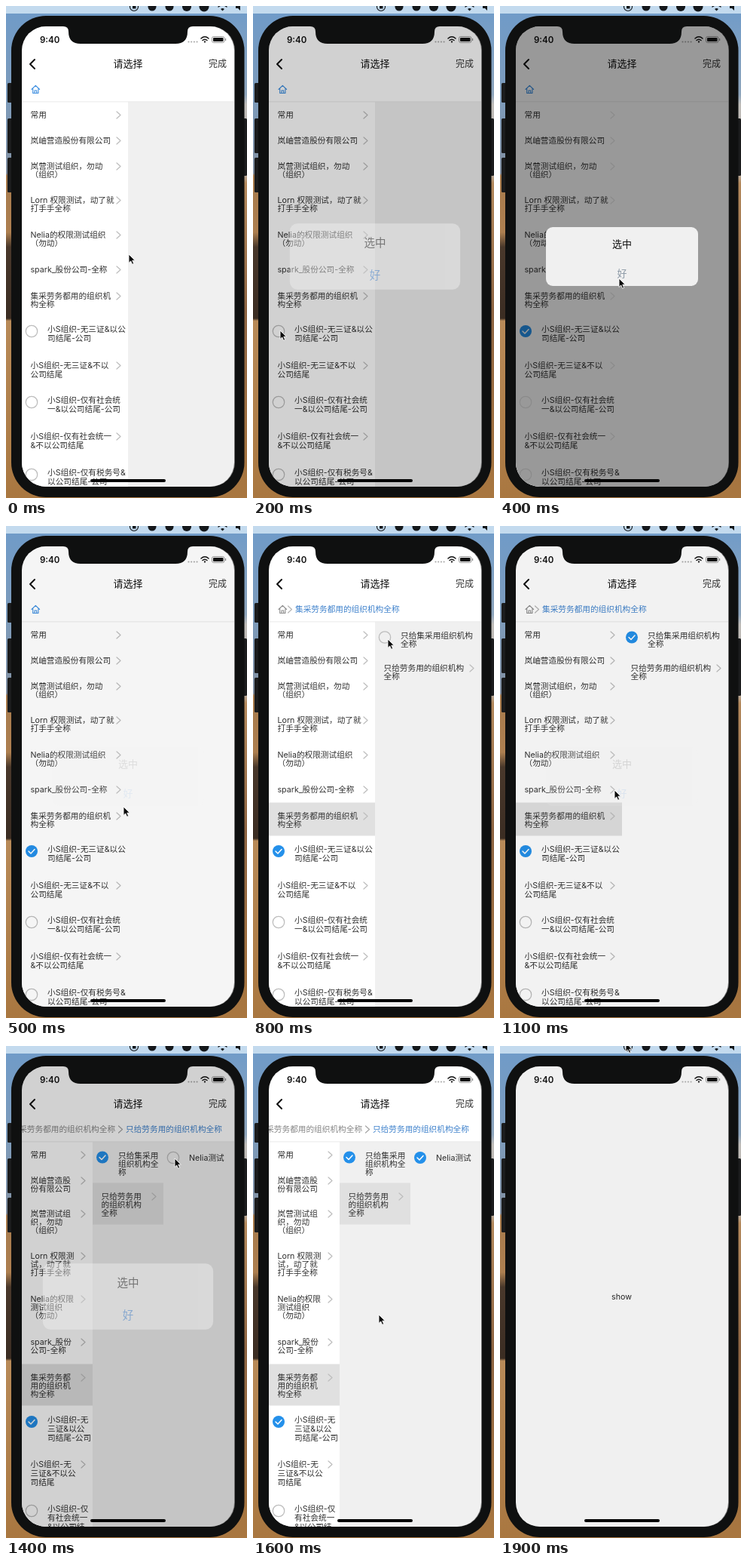
Recreate the animation shown at these times as an HTML page. Size 320 by 652 pixels, loop 2000 ms.

```html
<!DOCTYPE html>
<html lang="zh-CN">
<head>
<meta charset="utf-8">
<title>组织选择</title>
<style>
html, body { margin: 0; width: 100%; height: 100%; overflow: hidden; background: #101112; }
svg { display: block; width: 320px; height: 652px; }
text { font: 10.67px Inter, "Noto Sans CJK SC", "Noto Sans CJK", sans-serif; fill: #303030; white-space: pre; }
.line { fill: none; stroke-linecap: round; stroke-linejoin: round; }
</style>
</head>
<body>
<svg viewBox="0 0 320 652">
  <defs>
    <linearGradient id="left" x2="0" y2="1">
      <stop offset="0" stop-color="#6f9bc9"/><stop offset=".2" stop-color="#7e9bb9"/>
      <stop offset=".34" stop-color="#8290a2"/><stop offset=".345" stop-color="#a77b4d"/>
      <stop offset=".46" stop-color="#ad7f50"/><stop offset=".49" stop-color="#49382b"/>
      <stop offset=".635" stop-color="#3b2d23"/><stop offset=".64" stop-color="#b88a58"/>
      <stop offset="1" stop-color="#a97740"/>
    </linearGradient>
    <linearGradient id="right" x2="0" y2="1">
      <stop offset="0" stop-color="#6f9bc9"/><stop offset=".18" stop-color="#8fa6bd"/>
      <stop offset=".2" stop-color="#c0bdb9"/><stop offset=".34" stop-color="#b9b2ab"/>
      <stop offset=".36" stop-color="#b58a5d"/><stop offset=".62" stop-color="#8e6543"/>
      <stop offset="1" stop-color="#a97740"/>
    </linearGradient>
    <clipPath id="glass"><rect x="21" y="27" width="282" height="610" rx="32"/></clipPath>
  </defs>

  <!-- Desktop -->
  <rect width="160" height="652" fill="url(#left)"/>
  <rect x="160" width="160" height="652" fill="url(#right)"/>
  <rect width="320" height="10" fill="#c3daee"/>
  <g fill="#15181b">
    <circle cx="170" cy="1" r="5.5" fill="none" stroke="#15181b" stroke-width="1.2"/>
    <rect x="168" y="-1" width="4.5" height="4.5"/>
    <circle cx="194" cy="1" r="5.5"/><circle cx="217" cy="1" r="5.5"/>
    <circle cx="240" cy="1" r="6"/><circle cx="263" cy="1" r="6.5"/>
    <path d="M285 4l2.500 2.500 2.500-2.500q-2.500-2-5 0z"/>
    <path class="line" d="M282 1q5.500-4.500 11 0" stroke="#15181b" stroke-width="1.4"/>
    <path d="M305-1h3l3-3v10l-3-3h-3z"/>
  </g>

  <!-- Phone -->
  <g fill="#1b1c1d">
    <rect x="2" y="102" width="8" height="26" rx="1.500"/>
    <rect x="2" y="149" width="8" height="46" rx="1.500"/>
    <rect x="2" y="201" width="8" height="46" rx="1.500"/>
    <rect x="312" y="149" width="8" height="76" rx="1.500"/>
  </g>
  <rect x="7" y="13" width="309.500" height="638" rx="46" fill="#0f1010"/>
  <rect x="21.500" y="27" width="282.500" height="610" rx="32" fill="#727272"/>
  <g clip-path="url(#glass)">
    <g id="page"></g>
    <g id="status">
      <text x="45" y="49" style="font-size:11.500px;font-weight:600;fill:#111">9:40</text>
      <g fill="#aaa"><circle cx="242.500" cy="47.500" r="1.100"/><circle cx="246.200" cy="47.500" r="1.100"/><circle cx="249.900" cy="47.500" r="1.100"/><circle cx="253.600" cy="47.500" r="1.100"/></g>
      <g class="line" stroke="#111" stroke-width="1.500">
        <path d="M259 43q5-4.500 10 0M261 45.500q3-2.600 6 0"/><circle cx="264" cy="47.500" r=".4"/>
      </g>
      <rect x="273.500" y="40.500" width="16.500" height="8" rx="2.300" fill="none" stroke="#999"/>
      <rect x="275" y="42" width="13.500" height="5" rx="1" fill="#111"/>
      <rect x="291" y="43" width="1.200" height="3" fill="#999"/>
    </g>
    <g id="modal"></g>
    <rect x="112" y="627" width="100" height="4" rx="2" fill="#050505"/>
    <path d="M76 26V27Q83 27 83 34Q83 50 99 50H225Q241 50 241 34Q241 27 248 27V26Z" fill="#0f1010"/>
  </g>
  <path id="cursor" d="M0 0V11.500L2.700 9 4.600 13.300 6.700 12.400 4.800 8.200H8.400Z" fill="#0a0a0a" stroke="#fff" stroke-width=".9"/>
</svg>

<script>
const STEP = 100, STEPS = 20;
const TWO_COLUMNS = 7, THREE_COLUMNS = 13, DISMISSED = 18;
const BLUE = '#2490ea';

const pointer = [
  [163, 329], [95, 385], [36, 430], [108, 390], [158, 361], [156, 372], [148, 388],
  [157, 300], [179, 150], [177, 150], [163, 353], [152, 350], [242, 196], [236, 178],
  [224, 149], [166, 356], [167, 356], [278, 77], [245, 50], [167, -4]
];
const dialogOpacity = { 2: .45, 3: 1, 4: 1, 5: .1, 9: .45, 10: 1, 11: .13, 14: .45, 15: 1 };

// Rows: first line's centre, lines split by "|", optional kind: o = selectable, * = current
const wideRows = [
  [144, '常用'], [178, '岚岫营造股份有限公司'], [212, '岚营测试组织，勿动|（组织）'],
  [257, 'Lorn 权限测试，动了就|打手手全称'], [303, 'Nelia的权限测试组织|（勿动）'],
  [349, 'spark_股份公司-全称'], [384, '集采劳务都用的组织机|构全称', '*'],
  [428, '小S组织-无三证&以公|司结尾-公司', 'o'], [476, '小S组织-无三证&不以|公司结尾'],
  [522, '小S组织-仅有社会统|一&以公司结尾-公司', 'o'], [570, '小S组织-仅有社会统一|&不以公司结尾'],
  [618, '小S组织-仅有税务号&|以公司结尾-公司', 'o']
];
const narrowRows = [
  [144, '常用'], [178, '岚岫营造股|份有限公司'], [222, '岚营测试组|织，勿动|（组织）'],
  [278, 'Lorn 权限测|试，动了就|打手手全称'], [335, 'Nelia的权限|测试组织|（勿动）'],
  [392, 'spark_股份|公司-全称'], [439, '集采劳务都|用的组织机|构全称', '*'],
  [495, '小S组织-无|三证&以公|司结尾-公司', 'o'], [554, '小S组织-无|三证&不以公|司结尾'],
  [613, '小S组织-仅|有社会统一|&以公司结', 'o']
];
const wideChildren = [[144.5, '只给集采用组织机构|全称', 'o'], [188, '只给劳务用的组织机构|全称']];
const narrowChildren = [[144.5, '只给集采用|组织机构全|称', 'o'], [199, '只给劳务用|的组织机构|全称', '*']];
const leaves = [[148, 'Nelia测试', 'o']];

const rect = (x, y, w, h, fill, extra = '') =>
  `<rect x="${x}" y="${y}" width="${w}" height="${h}" fill="${fill}" ${extra}/>`;
const text = (x, y, s, style = '') =>
  `<text x="${x}" y="${y + 4}" style="${style}">${s.replace(/&/g, '&amp;')}</text>`;
const line = (d, color, width = 1.2) =>
  `<path class="line" d="${d}" stroke="${color}" stroke-width="${width}"/>`;
const chevron = (x, y, color) => line(`M${x - 2.5} ${y - 4.5}l5 4.500-5 4.500`, color);
const centred = (size, color, weight = 400) =>
  `font-size:${size}px;font-weight:${weight};fill:${color};text-anchor:middle`;

function radio(x, y, checked, color) {
  return checked
    ? `<circle cx="${x}" cy="${y}" r="8" fill="${BLUE}"/>` + line(`M${x - 4} ${y}l3 3 5-5.500`, '#fff', 1.5)
    : `<circle cx="${x}" cy="${y}" r="7.700" fill="none" stroke="${color}" stroke-width="1.300"/>`;
}

function column(x, width, rows, { checked, current = true, muted }) {
  let firstRadio = true;
  return rows.map(([y, label, kind]) => {
    const lines = label.split('|');
    const leading = label.includes('S') ? 12 : 11;
    let out = '';
    if (kind === '*' && current)
      out += rect(x, y - 17.5, width, 33 + leading * (lines.length - 1), '#e0e0e0');
    if (kind === 'o') {
      out += radio(x + 13, y + (lines.length > 1 ? 3 : 0), checked && firstRadio, muted);
      firstRadio = false;
    } else out += chevron(x + width - 12.5, y + .5, muted);
    const indent = kind === 'o' ? 34 : 11.5;
    return out + lines.map((s, i) => text(x + indent, y + i * leading, s)).join('');
  }).join('');
}

function header(columns) {
  const home = columns === 1 ? '#3b8de0' : '#8c8c8c';
  const house = line('M34 110.500l5.300-5.200 5.300 5.200M35.700 109.500v6h7.200v-6M38 115.500v-3.500h2.700v3.500', home, 1.1);
  const parent = '集采劳务都用的组织机构全称';
  const blue = 'fill:#3f82cc';
  const path = columns === 1 ? house
    : columns === 2 ? house + chevron(49, 110.5, '#b5b5b5') + text(56, 110, parent, blue)
    : text(6.5, 110, parent, 'fill:#858585') + chevron(152, 110.5, '#a5a5a5') + text(159, 110, '只给劳务用的组织机构全称', blue);
  return rect(21, 27, 282, 100, '#fff') + rect(21, 126.5, 282, .8, '#e4e4e4')
    + line('M38 71l-6 6 6 6', '#111', 2)
    + text(162, 77, '请选择', centred(13, '#111', 500))
    + text(269, 77, '完成', 'font-size:12px') + path;
}

function picker(step, opacity, opening) {
  const columns = step < TWO_COLUMNS ? 1 : step < THREE_COLUMNS ? 2 : 3;
  const width = columns === 3 ? 94 : 141;
  const panel = opacity && !opening ? '#fff' : '#f0f0f0';
  const muted = opacity === 1 ? '#e6e6e6' : '#bdbdbd';
  let out = rect(21, 127, 282, 510, panel) + rect(21, 127, width, 510, '#fff') + header(columns)
    + column(21, width, columns === 3 ? narrowRows : wideRows, { checked: step >= 3, current: columns > 1, muted });
  if (columns > 1)
    out += column(21 + width, width, columns === 3 ? narrowChildren : wideChildren, { checked: step >= 10, muted });
  if (columns === 3)
    out += column(209, 94, leaves, { checked: step >= 15, muted });
  return out;
}

function dialog(opacity, opening, pressed) {
  if (!opacity) return '';
  const scale = opening ? 1.12 : 1;
  return rect(21, 27, 282, 610, '#000', `opacity="${.4 * opacity}"`)
    + `<g opacity="${opacity}" transform="translate(162 332) scale(${scale})">`
    + rect(-101, -39, 202, 78, '#f0f0f0', 'rx="9"')
    + text(0, -16, '选中', centred(13, '#111', 500))
    + text(0, 23, '好', centred(13, pressed ? '#8b98a5' : '#3f87dc')) + '</g>';
}

const $ = id => document.getElementById(id);

function draw(step) {
  const opacity = dialogOpacity[step] || 0;
  const opening = dialogOpacity[step + 1] > opacity;
  $('page').innerHTML = step < DISMISSED
    ? picker(step, opacity, opening)
    : rect(21, 27, 282, 610, '#f0f0f0') + text(161.5, 332, 'show', centred(10.67, '#222'));
  $('modal').innerHTML = dialog(opacity, opening, step === 4);
  $('cursor').setAttribute('transform', `translate(${pointer[step]})`);
}

let shown = -1;
const start = performance.now();
function tick() {
  const step = Math.floor((performance.now() - start) / STEP) % STEPS;
  if (step !== shown) draw(shown = step);
  requestAnimationFrame(tick);
}
tick();
</script>
</body>
</html>
```
